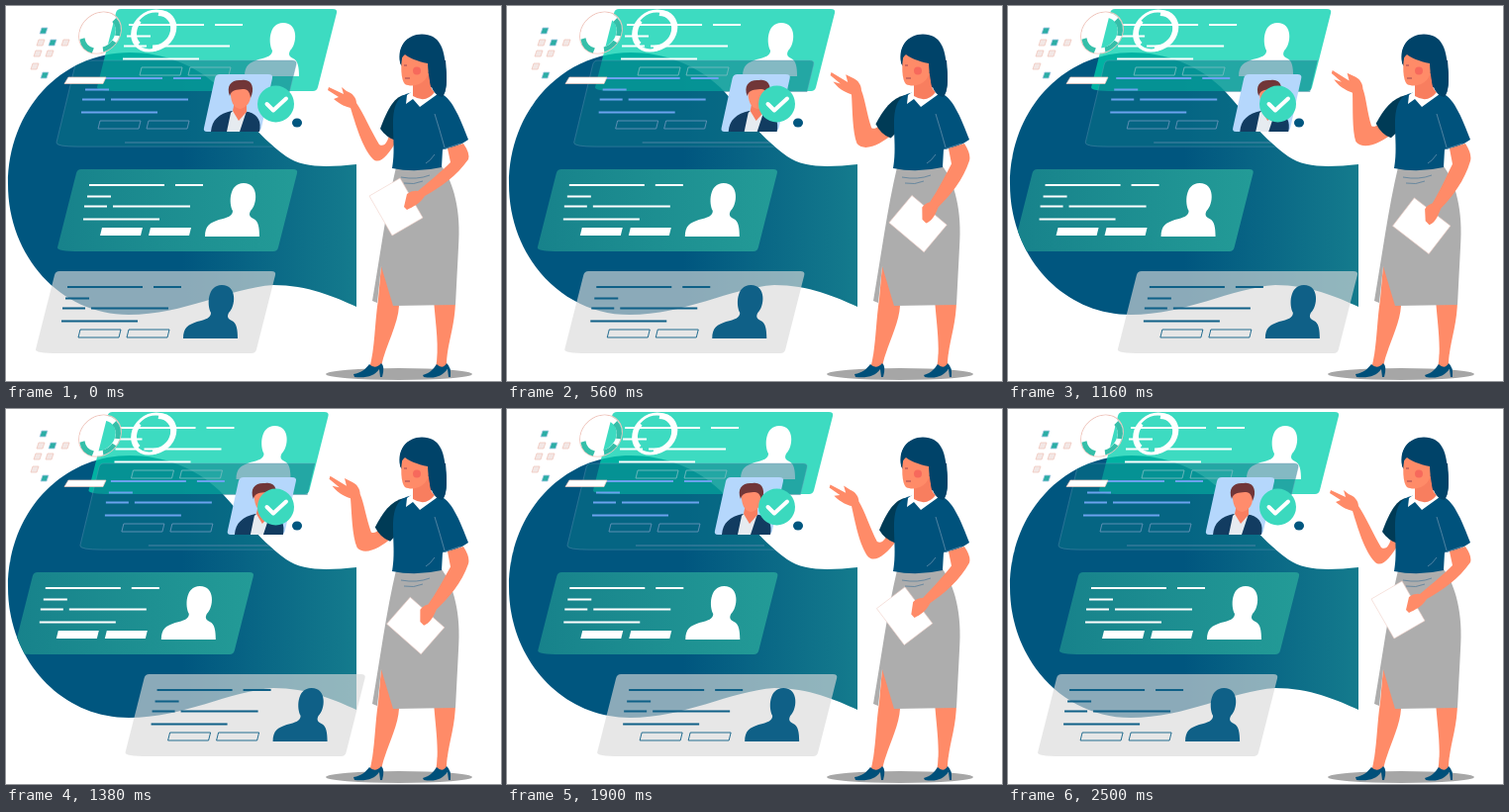
Animation, 500 px wide and 379 px high, one loop 2.52 s. Source, as an HTML page:

```html
<!DOCTYPE html>
<html lang="en">
<head>
<meta charset="utf-8">
<title>Profile cards</title>
<style>
  html, body { margin: 0; width: 100%; height: 100%; overflow: hidden; background: #fff; }
  svg { display: block; width: 100%; height: 100%; }
</style>
</head>
<body>
<svg viewBox="0 0 500 379">
  <defs>
    <linearGradient id="sea"><stop offset=".5" stop-color="#00567f"/><stop offset="1" stop-color="#147b8d"/></linearGradient>
    <linearGradient id="teal"><stop offset="0" stop-color="#17828b"/><stop offset="1" stop-color="#239b97"/></linearGradient>
    <path id="blob" d="M125 47C160 47 192 60 215 82C238 105 250 128 283 152C300 164 325 163 354 160V304C332 294 305 282 270 282C225 285 180 312 124 312C55 312 2 253 2 180C2 106 55 47 125 47Z"/>
    <path id="panel" d="M24 0H218Q223 0 222 4L203 79Q202 83 198 83H3Q-21 83 -20 79L-1 4Q0 0 4 0Z"/>
    <path id="bust" d="M129 68C129 57 134 54 143 51C152 49 157 47 157 42C153 35 153 14 168 14C184 14 182 36 175 42C173 46 174 48 178 50C183 52 184 59 184 68Z"/>
    <clipPath id="inBlob"><use href="#blob"/></clipPath>
    <clipPath id="veil"><use href="#blob"/><path id="veilTop" d="M112 3H333L313 87H91Z"/></clipPath>
  </defs>

  <use href="#blob" fill="url(#sea)"/>
  <g id="top"></g>
  <g clip-path="url(#veil)"><g id="blue"></g></g>
  <g clip-path="url(#inBlob)"><g id="mid"></g></g>
  <g id="grey"></g>

  <g id="photo">
    <path d="M216 69H265Q270 69 269 73L258 123Q257 127 253 127H203Q199 127 200 123L211 73Q212 69 216 69Z" fill="#b5d7fc"/>
    <path d="M207 127C208 115 215 109 228 106L245 107C255 110 258 117 256 127Z" fill="#123c61"/>
    <path d="M227 108L231 104L243 106L239 118L236 127H223Z" fill="#e6ebf0"/>
    <path d="M231 96H243V107L235 116L229 106Z" fill="#f97e60"/>
    <path d="M227 84C229 77 248 78 247 89C248 99 240 104 236 104C230 103 226 96 227 84Z" fill="#ff8c6c"/>
    <path d="M226 91C222 80 228 74 238 75C248 73 252 83 247 93C246 85 243 84 239 84C233 85 228 84 226 91Z" fill="#713638"/>
  </g>
  <circle cx="272.500" cy="99" r="18.500" fill="#3bd9be"/>
  <path d="M263.500 99L270 105.500L283 93.500" fill="none" stroke="#fff" stroke-width="4" stroke-linecap="round" stroke-linejoin="round"/>
  <ellipse cx="294" cy="118" rx="5" ry="4.500" fill="#00567f"/>

  <g fill="none" transform="translate(95 27) skewX(-10)">
    <circle r="21" stroke="#efc4bb"/>
    <circle r="18" stroke="#fff" stroke-width="5"/>
    <path d="M-4 18A18 18 0 0 1 -17 6M12 -13A18 18 0 0 1 18 3M16 9A18 18 0 0 1 6 17" stroke="#35bfa9" stroke-width="5"/>
  </g>
  <g fill="none" transform="translate(148 25) skewX(-10)">
    <circle r="20" stroke="#fff" stroke-width="3"/>
    <path d="M3 -18A18 18 0 0 1 3 18" stroke="#fff" stroke-width="6"/>
    <path d="M-12 14A18 18 0 0 1 -15 -10" stroke="#fff" stroke-width="5"/>
  </g>
  <path d="M63 72H101L98 78.500H59Z" fill="#fff" stroke="#f3c9bd" stroke-width=".7"/>
  <g id="squares"></g>

  <ellipse cx="397" cy="372" rx="74" ry="6" fill="#a6a6a6"/>
  <g fill="#ff8b68">
    <path d="M379 262L397 303C396 322 384 342 379 364L367 367C373 344 372 324 376 296Z"/>
    <path d="M432 296H454C454 324 445 342 445 364L434 367C438 344 434 324 432 296Z"/>
  </g>
  <g fill="#00507a">
    <path d="M351 372C359 371 364 366 367 362Q373 368 379 361Q383 364 380 375H378L377 367C372 374 365 376 352 375Z"/>
    <path d="M421 373C429 371 432 366 435 362Q441 368 445 361Q450 365 449 375H447L446 367C440 374 434 377 422 375Z"/>
  </g>
  <path d="M394 163L440 162C452 178 460 207 457 244L454 302L391 303L379 263L375 300L370 298C378 252 384 205 394 163Z" fill="#adadad"/>
  <path d="M399 173Q415 176 428 171M402 179Q412 181 421 177" fill="none" stroke="#587f9b" stroke-width=".8"/>
  <path d="M425 50C430 29 402 22 398 48V58L418 88C425 94 438 92 443 88C446 78 445 66 444 55Z" fill="#004369"/>
  <path id="arm" fill="#ff8b68"/>
  <path id="sleeve" fill="#003b56"/>
  <path d="M402 90C410 86 430 84 438 88C449 91 458 111 467 135C459 141 449 144 441 145L440 163Q414 169 390 164C394 144 389 120 392 106C394 96 398 92 402 90Z" fill="#00527c"/>
  <path d="M433 109Q438 125 443 143M424 159Q428 157 433 150M441 145L459 139" fill="none" stroke="#6490ad" stroke-width=".8"/>
  <path d="M405 90L412 85L431 82L436 89L418 102L411 94L404 99Z" fill="#fff"/>
  <path d="M411 75L428 67C428 78 428 83 433 87Q424 99 411 91Z" fill="#f87e5f"/>
  <path d="M401 48C398 60 399 75 403 79C411 83 425 79 427 66L429 50Q415 41 401 48Z" fill="#ff8b68"/>
  <path d="M398 57C395 41 405 28.500 420 28.500C438 28.500 443 43 444 62C446 76 445 86 441 92C432 91 427 81 426 58C415 56 407 52 403 49Q399 52 398 57Z" fill="#004369"/>
  <circle cx="415" cy="65.500" r="4" fill="#f7695c"/>
  <path d="M402 60L405 60M403 73L408 73" stroke="#9d4450" stroke-width="1"/>
  <path id="paper" d="M-27 -11L4 -29L27 11L-4 29Z" fill="#fff" stroke="#f0cfc7" stroke-width=".6"/>
  <path id="forearm" fill="#ff8b68"/>
</svg>

<script>
const LOOP = 2520;
const $ = id => document.getElementById(id);

const LINES = [[12, 16, 88], [99, 16, 127], [10, 27.5, 34], [7, 37.5, 30], [36, 37.5, 114], [6, 50.5, 83]];
const rules = color => `<path d="${LINES.map(([x, y, end]) => `M${x} ${y}H${end}`).join('')}" stroke="${color}" stroke-width="1.8"/>`;
const buttons = style => [25, 74].map(x => `<path d="M${x} 59h41l-2 8h-41Z" ${style}/>`).join('');
const panel = style => `<use href="#panel" ${style}/>`;
const bust = color => `<use href="#bust" fill="${color}"/>`;
const outline = color => `fill="none" stroke="${color}" stroke-width=".9"`;

$('top').innerHTML = panel('fill="#00d0ae" fill-opacity=".76"') + rules('#fff') + buttons(outline('#d8fff5')) + bust('#fff');
$('blue').innerHTML = `<g transform="translate(1 -2) scale(1 1.05)">${
  panel('fill="#0b7488" fill-opacity=".5"') + panel(outline('#6e9ab8') + ' opacity=".4"')}</g>` +
  rules('#6ba2ee') + buttons(outline('#6693b8')) + '<path d="M50 81H180" stroke="#4d83a4"/>';
$('mid').innerHTML = panel('fill="url(#teal)"') + rules('#fff') + buttons('fill="#fff"') + bust('#fff');
$('grey').innerHTML = panel('fill="#d9d9d9" fill-opacity=".64"') + rules('#0f6087') + buttons(outline('#0f6087')) + bust('#0f6087');

// id, rest x, rest y, travel, time of the far turn
const SLIDERS = [
  ['top', 112, 3, -8.5, 1400],
  ['blue', 70, 57, 28, 1000],
  ['mid', 72, 165, -46.5, 1190],
  ['grey', 50, 268, 92, 1500],
  ['photo', 0, 0, 28, 1000],
  ['veilTop', 0, 0, -8.5, 1400]
];

// x, y, teal or pale, blink group
const SQUARES = [
  [38, 25, 1, 0], [35, 37, 0, 0], [47, 37, 1, 0], [60, 37, 0, 1],
  [32, 48, 0, 1], [44, 48, 0, 0], [29, 61, 0, 2], [39, 70, 1, 0]
];
$('squares').innerHTML = SQUARES.map(([x, y, teal]) =>
  `<path d="M${x - 2} ${y - 3}h6l-2 6h-6Z" fill="${teal ? '#2bada5' : '#f3e7e5'}" stroke="${teal ? '#a9cbe5' : '#f0c8be'}" stroke-width=".8"/>`).join('');

// Each pair is the lowered and the raised pose, with matching points
const POSES = {
  arm: [
    'M388 126C386 138 382 143 377 140C369 127 361 108 354 98C354 93 350 88 344 86L339 82L341 89L326 82L325 85L336 92L331 94C338 100 344 102 348 103C353 119 360 144 371 155C378 161 387 149 394 137Z',
    'M382 110C374 117 370 121 366 119C362 105 362 91 359 82C359 77 356 72 352 70L343 66L345 74L328 63L327 66L337 75L329 72C336 82 344 84 348 86C348 101 346 123 349 135C357 145 376 137 389 127Z'
  ],
  sleeve: [
    'M402 90C391 92 384 108 378 124Q384 133 394 136L401 120Z',
    'M402 90C388 93 379 104 371 118Q376 129 386 133L401 120Z'
  ],
  forearm: [
    'M446 144L462 139Q469 149 467 155C456 171 438 184 423 192C418 200 411 203 405 206L402 203L405 190Q410 186 416 187C427 178 441 166 449 158Z',
    'M446 144L462 139Q469 150 467 157C462 177 450 194 439 206C435 217 433 221 428 223L424 219L423 207Q425 203 430 201C437 189 443 173 449 160Z'
  ]
};

const mix = (a, b, p) => a + (b - a) * p;

// Eased there-and-back movement, 0 to 1 to 0
function swing(t, turn) {
  const u = t < turn ? t / turn : (LOOP - t) / (LOOP - turn);
  return (1 - Math.cos(Math.PI * u)) / 2;
}

function morph([from, to], p) {
  const ends = to.match(/-?[\d.]+/g);
  let i = 0;
  return from.replace(/-?[\d.]+/g, n => mix(+n, +ends[i++], p).toFixed(2));
}

function draw(now) {
  const t = now % LOOP;
  for (const [id, x, y, travel, turn] of SLIDERS)
    $(id).setAttribute('transform', `translate(${x + travel * swing(t, turn)} ${y})`);

  const p = swing(t, 800);
  for (const id in POSES) $(id).setAttribute('d', morph(POSES[id], p));
  $('paper').setAttribute('transform',
    `translate(${mix(394, 420.5, p)} ${mix(203, 224.5, p)}) rotate(${-25 * p})`);

  const beat = t % 1360;
  const shown = [beat < 660 || beat > 1020, t < 200 || t > 480, true];
  SQUARES.forEach((square, i) => {
    $('squares').children[i].style.display = shown[square[3]] ? '' : 'none';
  });
  requestAnimationFrame(draw);
}
requestAnimationFrame(draw);
</script>
</body>
</html>
```
